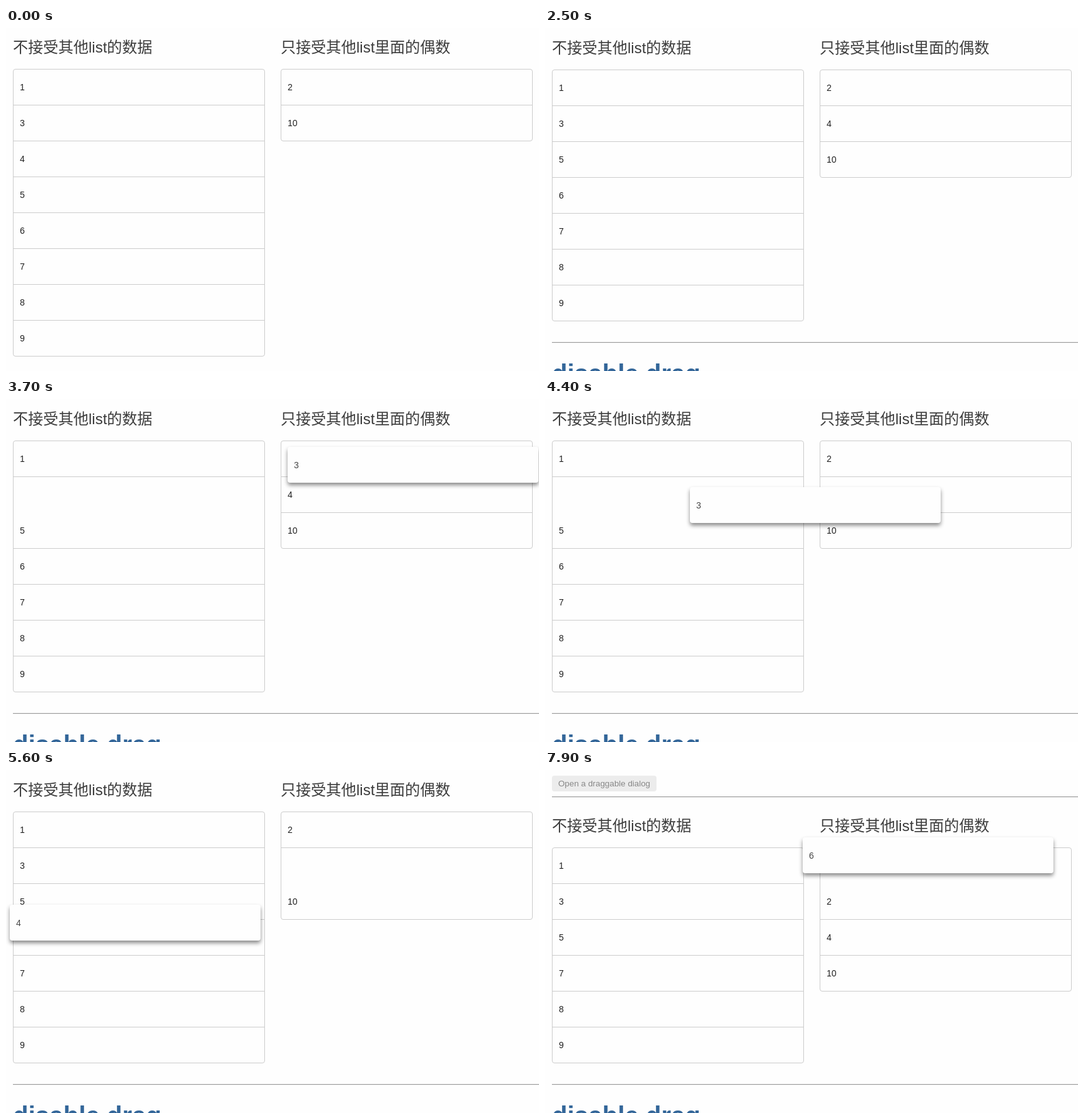
An HTML page that plays this animation: 846 px wide and 545 px high, repeating every 8 s.

```html
<!DOCTYPE html>
<html lang="zh">
<head>
<meta charset="utf-8">
<title>Drag lists</title>
<style>
  html, body { margin: 0; width: 100%; height: 100%; overflow: hidden; background: #fefefe; }
  svg { display: block; width: 846px; height: 545px; font-family: "Liberation Sans", "Noto Sans CJK SC", "Noto Sans CJK", sans-serif; }
  .title { font-size: 24px; fill: #3c3c3c; }
  .row { font-size: 14px; fill: #222; }
  .held { font-size: 14px; fill: #484848; }
  .button { font-size: 13.333px; fill: #888; }
  .section { font-size: 40px; font-weight: bold; fill: #369; }
  .line { fill: none; stroke: #ccc; }
</style>
</head>
<body>
<svg id="stage" viewBox="0 0 846 545"></svg>
<script>
const LOOP = 8000, STEP = 100, SLIDE = 200;
const ROW = 57, WIDTH = 400, LEFT = 11, RIGHT = 436, GAP = 0;
const stage = document.getElementById("stage");

// Key points of each drag: time, x, y. The card lands at the last one.
const drags = [
  { item: 4, settle: 2200, end: 2500,
    keys: [[1300, 23, 183], [1600, 332, 134], [1800, 408, 103], [2200, 437, 123]] },
  { item: 3, end: 4600,
    keys: [[3000, 29, 127], [3200, 239, 144], [3700, 447, 76], [4400, 230, 140], [4600, 12, 123]] },
  { item: 4, end: 6100,
    keys: [[5000, 437, 123], [5200, 282, 115], [5400, 128, 73], [5600, 6, 214], [5800, 8, 211], [6100, 437, 123]] },
  { item: 6, end: LOOP,
    keys: [[7400, 15, 236], [7600, 236, 229], [7800, 360, 121], [7900, 409, 107]] }
];

// An item changes lists, which also scrolls the page to a new list top.
const moves = [
  { at: 1600, item: 4, index: 1, top: 66 },
  { at: 7700, item: 6, index: 0, top: 123 }
];

// Smooth curve through the keys that never overshoots them.
function along(keys, t, axis) {
  const n = keys.length - 1;
  const slope = i => (keys[i + 1][axis] - keys[i][axis]) / (keys[i + 1][0] - keys[i][0]);
  const tangent = i => {
    if (i === 0) return slope(0);
    if (i === n) return slope(n - 1);
    const a = slope(i - 1), b = slope(i);
    return a * b > 0 ? 2 * a * b / (a + b) : 0;
  };
  if (t >= keys[n][0]) return keys[n][axis];
  const i = keys.findIndex((k, j) => t < keys[j + 1][0]);
  const span = keys[i + 1][0] - keys[i][0];
  const s = (t - keys[i][0]) / span, r = 1 - s;
  return keys[i][axis] * r * r * (1 + 2 * s) + keys[i + 1][axis] * s * s * (3 - 2 * s) +
    span * s * r * (tangent(i) * r - tangent(i + 1) * s);
}

function layout(t) {
  const page = { top: 65, left: [1, 3, 4, 5, 6, 7, 8, 9], right: [2, 10], slide: 0 };
  for (const move of moves.filter(m => m.at <= t)) {
    page.top = move.top;
    page.left = page.left.filter(n => n !== move.item);
    page.right.splice(move.index, 0, move.item);
    page.slide = Math.round(ROW * Math.max(0, 1 - (t - move.at + STEP) / SLIDE));
  }
  return page;
}

const text = (cls, x, y, s) => `<text class="${cls}" x="${x}" y="${y}">${s}</text>`;
const rect = (x, y, w, h, fill, extra = "") =>
  `<rect x="${x}" y="${y}" width="${w}" height="${h}" fill="${fill}" ${extra}/>`;
const rule = y => rect(LEFT, y, WIDTH * 3, 1, "#9a9a9a") + rect(LEFT, y + 1, WIDTH * 3, 1, "#eee");

function list(x, top, items, slide) {
  let out = `<rect class="line" x="${x + .5}" y="${top + .5}" width="${WIDTH - 1}" height="${items.length * ROW}" rx="3.5"/>`;
  const gap = items.indexOf(GAP);
  items.forEach((item, i) => {
    if (item === GAP) return;
    const y = top + i * ROW - (gap >= 0 && i > gap ? slide : 0);
    out += text("row", x + 11, y + 34, item);
    if (i < items.length - 1 || slide)
      out += `<path class="line" d="M${x + 1} ${y + ROW + .5}h${WIDTH - 2}"/>`;
  });
  return out;
}

function card(drag, t) {
  const x = Math.round(along(drag.keys, t, 1)), y = Math.round(along(drag.keys, t, 2));
  const depth = t > drag.settle ? (drag.end - t) / (drag.end - drag.settle) : 1;
  const shadow = `drop-shadow(0 4px 3px rgba(0,0,0,${.45 * depth}))`;
  return `<g style="filter:${shadow}">` + rect(x, y, WIDTH - 2, ROW, "#fefefe", 'rx="4"') + "</g>" +
    text("held", x + 10, y + 34, drag.item);
}

function render(t) {
  const { top, left, right, slide } = layout(t);
  const drag = drags.find(d => t >= d.keys[0][0] && t < d.end);
  const shown = items => items.map(n => drag && n === drag.item ? GAP : n);
  const end = top + left.length * ROW;

  stage.innerHTML = rect(0, 0, 846, 545, "#fefefe") +
    rect(LEFT, top - 114, 166, 25, "#ececec", 'rx="4"') +
    text("button", 21, top - 97, "Open a draggable dialog") +
    rule(top - 81) +
    text("title", LEFT, top - 26, "不接受其他list的数据") +
    text("title", RIGHT, top - 26, "只接受其他list里面的偶数") +
    list(LEFT, top, shown(left), 0) +
    list(RIGHT, top, shown(right), slide) +
    rule(end + 34) +
    text("section", LEFT, end + 98, "disable drag") +
    (drag ? card(drag, t) : "");
}

const begin = performance.now();
let last = -1;
function tick() {
  const t = Math.floor((performance.now() - begin) % LOOP / STEP) * STEP;
  if (t !== last) render(t);
  last = t;
  requestAnimationFrame(tick);
}
tick();
</script>
</body>
</html>
```
